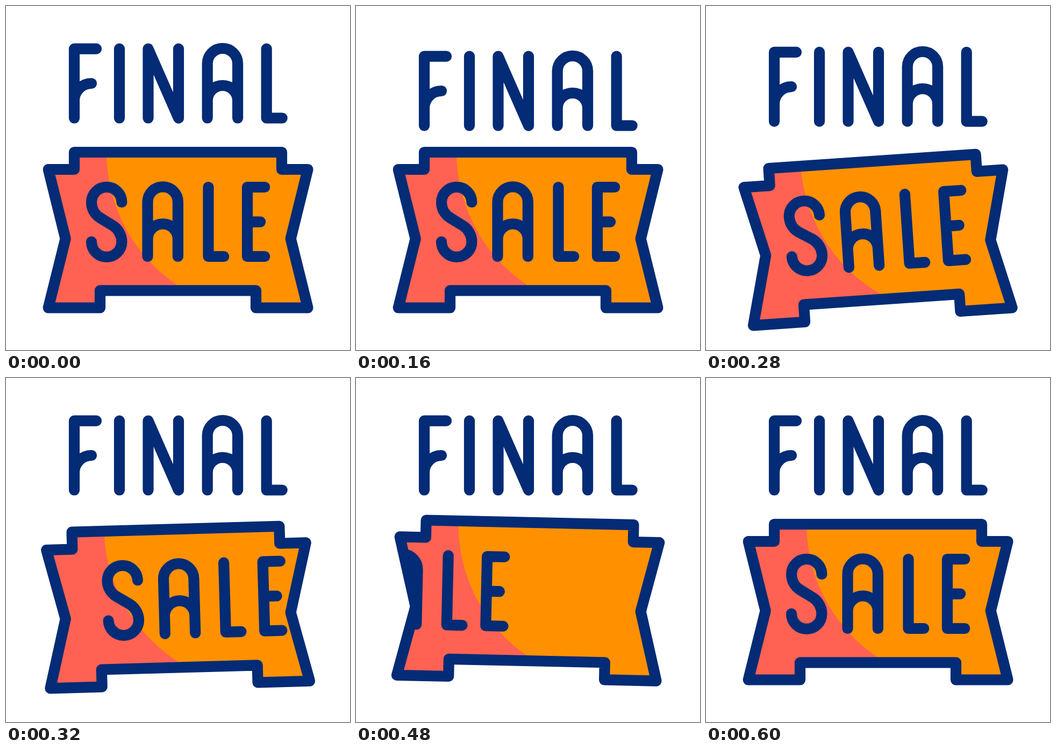
Recreate the animation shown at these times as an HTML page with a canvas. Size 640x640 px, loop 1.48 s.

```html
<!DOCTYPE html>
<html lang="en">
<head>
<meta charset="utf-8">
<title>Final sale</title>
<style>
html, body { margin: 0; width: 100%; height: 100%; overflow: hidden; background: #fff; }
canvas { display: block; width: 100vmin; height: 100vmin; }
</style>
</head>
<body>
<canvas id="stage" width="640" height="640"></canvas>
<script>
const ctx = document.getElementById('stage').getContext('2d');
const LOOP = 1480, STEP = 40;
const NAVY = '#042b75', CORAL = '#ff6252', ORANGE = '#ff9100';

const letterA = (x, y) =>
  `M${x} ${y + 129.5}V${y + 28}a28.2 28.2 0 0 1 56.4 0V${y + 129.5}` +
  `M${x} ${y + 97}a28.2 28.2 0 0 1 56.4 0`;

const finalWord = new Path2D(
  'M127 208.5V79.7H168M127 176A32 32 0 0 1 159 144' +
  'M211 79.7V208.5' +
  'M264.5 208.5V79.7L321 208.5V79.7' +
  letterA(374.7, 79) +
  'M484.7 79.7V208.5H513.7');

const saleWord = new Path2D(
  'M215.4 365A28.2 28.2 0 0 0 159 365C159 377 165 388 175 394' +
  'L199.4 409C209 415 215.4 427 215.4 438.7A28.2 28.2 0 0 1 159 438.7' +
  letterA(263.5, 336.5) +
  'M376.5 337V466H405.2' +
  'M481.2 337H449V466H481.2M449 401.6H473.2');

const banner = new Path2D(
  'M127 272H513V304H561.5L529.7 433L561.5 561.5H465V529.3H175V561.5' +
  'H78.7L110.7 433L78.7 304H127Z');

const disc = new Path2D();
disc.arc(485, 272, 298, 0, Math.PI * 2);

// Tilt in degrees and vertical shift of the banner
const sway = [
  { t: 160, tilt: 0, y: 0 },
  { t: 280, tilt: -3.9, y: 16.7 },
  { t: 400, tilt: 4.9, y: -12.5 },
  { t: 520, tilt: 0, y: 0 }
];

function swayAt(t) {
  const i = sway.findIndex(k => k.t > t);
  if (i < 1) return { tilt: 0, y: 0 };
  const a = sway[i - 1], b = sway[i];
  const u = (t - a.t) / (b.t - a.t);
  const e = u * u * (3 - 2 * u);
  return { tilt: a.tilt + (b.tilt - a.tilt) * e, y: a.y + (b.y - a.y) * e };
}

function hopAt(t) {
  const u = Math.min(t / 320, 1);
  return 56 * u * (1 - u);
}

function strokeAt(path, x, y) {
  ctx.save();
  ctx.translate(x, y);
  ctx.stroke(path);
  ctx.restore();
}

function drawSale(t) {
  // One word leaves to the right while the next arrives from the left
  const late = Math.max(0, t - 400);
  const leave = 2 * Math.max(0, t - 304.3) + 0.0075 * late * late;
  if (t < 560) strokeAt(saleWord, leave, 0);
  if (t > 304) strokeAt(saleWord, -2 * Math.max(0, 583.5 - t), 0);
}

function drawBanner(t) {
  const { tilt, y } = swayAt(t);
  ctx.save();
  ctx.translate(320, 433 + y);
  ctx.rotate(tilt * Math.PI / 180);
  ctx.translate(-320, -433);

  ctx.save();
  ctx.clip(banner);
  ctx.fillStyle = CORAL;
  ctx.fill(banner);
  ctx.fillStyle = ORANGE;
  ctx.fill(disc);
  drawSale(t);
  ctx.restore();

  ctx.stroke(banner);
  ctx.restore();
}

function draw(t) {
  ctx.fillStyle = '#fff';
  ctx.fillRect(0, 0, 640, 640);
  ctx.strokeStyle = NAVY;
  ctx.lineWidth = 20.2;
  ctx.lineCap = ctx.lineJoin = 'round';
  strokeAt(finalWord, 0, hopAt(t));
  drawBanner(t);
}

const start = performance.now();
function tick() {
  const t = (performance.now() - start) % LOOP;
  draw(Math.floor(t / STEP) * STEP);
  requestAnimationFrame(tick);
}
tick();
</script>
</body>
</html>
```
